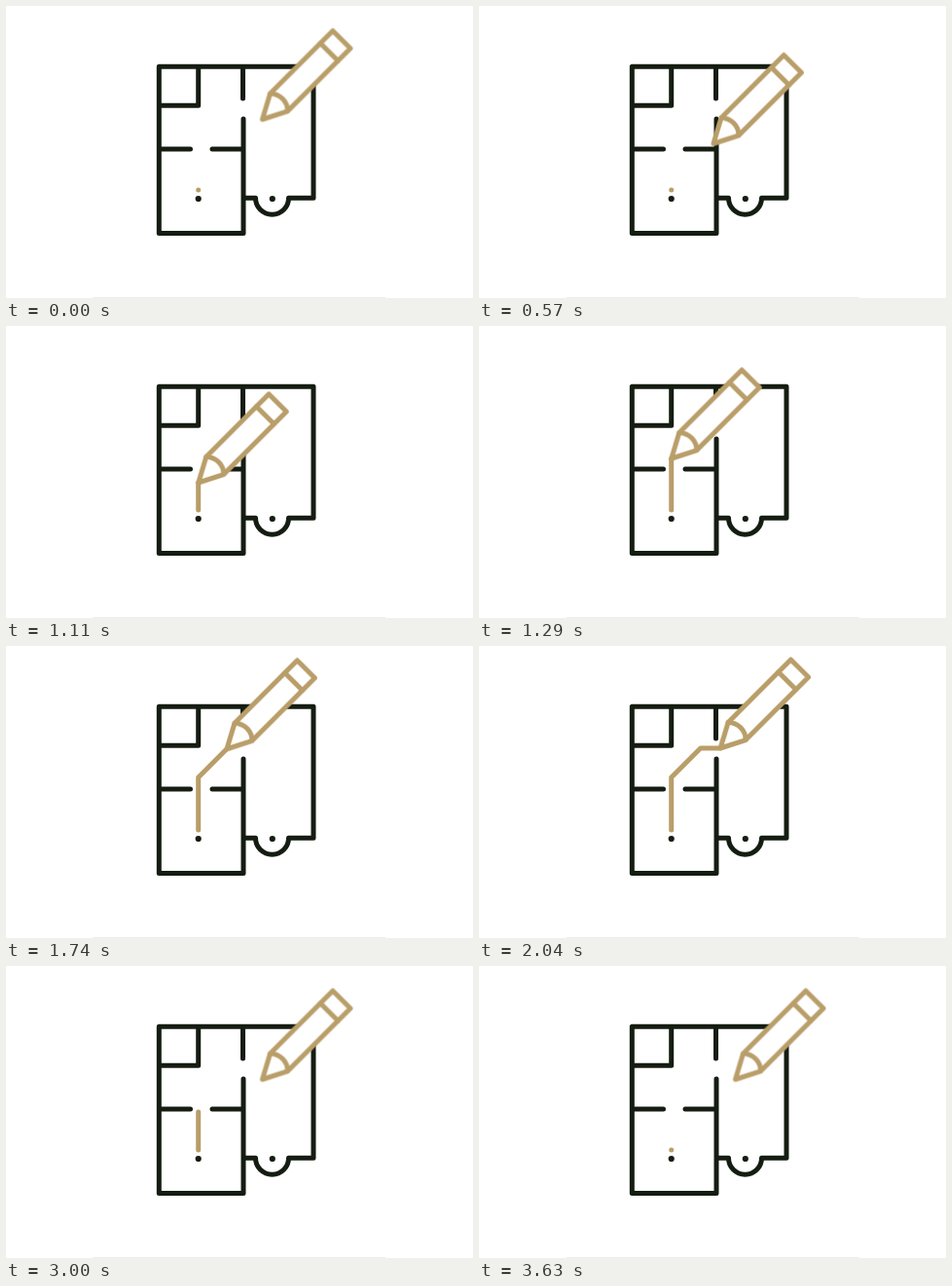
These frames come from a looping animation (480 by 300 pixels, 3.66 s). An HTML page:

```html
<!DOCTYPE html>
<html lang="en">
<head>
<meta charset="utf-8">
<title>Floor plan</title>
<style>
  :root { --ink: #151d12; --gold: #b99e69; --loop: 3660ms; }
  html, body { margin: 0; width: 100%; height: 100%; overflow: hidden; background: #fff; }
  svg { display: block; width: 480px; height: 300px; }
  path { fill: none; stroke-width: 5; stroke-linecap: round; stroke-linejoin: round; }
  .plan { stroke: var(--ink); }
  .dot { fill: var(--ink); }
  .trail, .pencil path { stroke: var(--gold); }
  .pencil .body { fill: #fff; }
  .pencil, .trail {
    animation: var(--loop) cubic-bezier(.333, 0, .667, 1) infinite;
  }
  .pencil { animation-name: move; }
  .trail { animation-name: draw; }

  @keyframes move {
    0%, 10.11% { transform: translate(263.5px, 116.5px); }
    24.04% { transform: translate(197.7px, 189px); }
    36.34% { transform: translate(197.7px, 135px); }
    48.77% { transform: translate(227.7px, 105px); }
    61.61% { transform: translate(263.7px, 105px); }
    73.77%, 100% { transform: translate(263.5px, 116.5px); }
  }
  /* Dash lengths follow the pencil tip, then shrink back to a dot. */
  @keyframes draw {
    0%, 24.04% { stroke-dasharray: 0 300; }
    36.34% { stroke-dasharray: 54 300; }
    48.77% { stroke-dasharray: 96.4 300; }
    61.61%, 73.77% { stroke-dasharray: 132.4 300; }
    86.61%, 100% { stroke-dasharray: 0 300; }
  }
</style>
</head>
<body>
<svg viewBox="0 0 480 300">
  <path d="M90 299.5H390" style="stroke:#eee;stroke-width:1;stroke-linecap:butt"/>
  <path class="plan" d="M244 116V233.5H157.3V62.3H316V197.3H290.5
    A17 17 0 0 1 256.5 197.3H244
    M243.5 62.3V95 M197.7 62.3V102.3H157.3 M157.3 147H189.5 M212 147H244"/>
  <circle class="dot" cx="273.8" cy="198" r="3.1"/>
  <circle class="dot" cx="197.7" cy="198" r="3.1"/>
  <path class="trail" d="M197.7 189V135L227.7 105H263.7"/>
  <g class="pencil">
    <path class="body" d="M0 0L8 -26.5L72.4 -91L90.5 -73L26 -8.4Z"/>
    <path d="M8 -26.5A18 18 0 0 1 26 -8.4M59.6 -78.2L77.7 -60.2"/>
  </g>
</svg>
</body>
</html>
```
